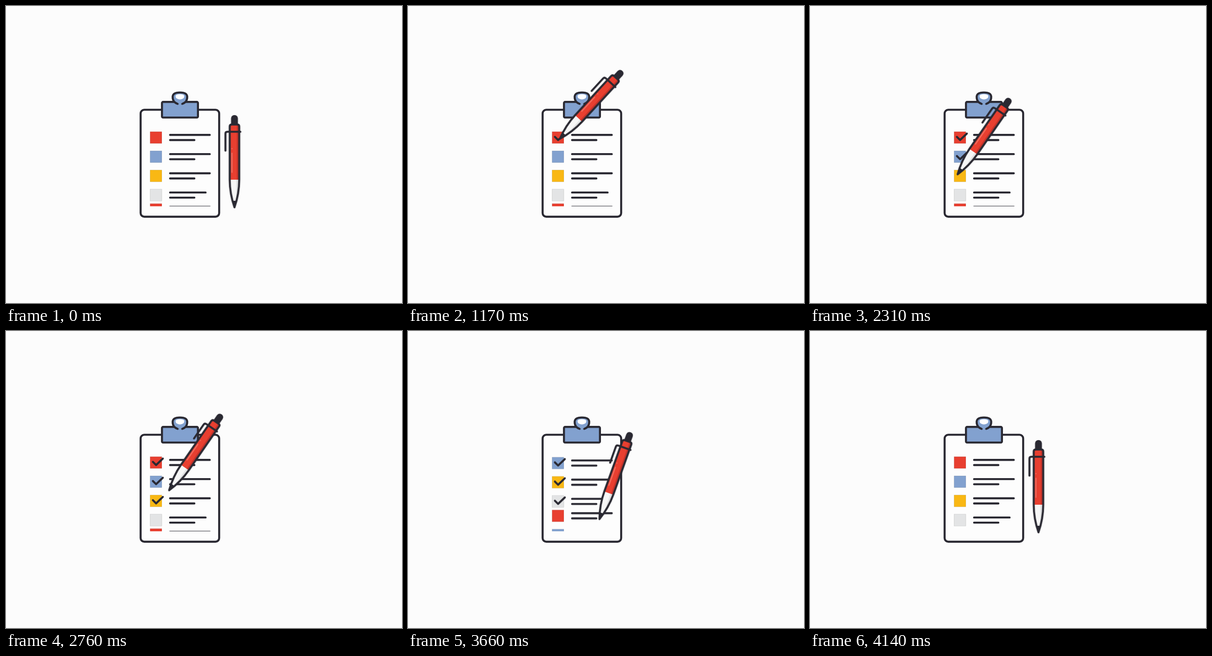
An HTML page without scripts for the animation above (4.5 s loop, 864x648 px).

```html
<!DOCTYPE html>
<html lang="en">
<head>
<meta charset="utf-8">
<title>Checklist</title>
<style>
  html, body { margin: 0; width: 100%; height: 100%; overflow: hidden; background: #fcfcfc; }
  svg { display: block; width: 864px; height: 648px; }
  :root { --ink: #2a2932; --blue: #82a1cf; --red: #e83f30; --gold: #f9b814; --grey: #e3e4e5; }

  .ink { stroke: var(--ink); stroke-width: 4.4; stroke-linecap: round; stroke-linejoin: round; }
  .open { fill: none; }
  .box { stroke: #0003; stroke-width: .6; }
  .tick { stroke-dasharray: 100 300; }

  .pen, .list, .tick { animation: 4.5s linear infinite; }
  .pen { animation-name: write; }
  .list { animation-name: scroll; }
  .t1 { animation-name: tick1; }
  .t2 { animation-name: tick2; }
  .t3 { animation-name: tick3; }
  .t4 { animation-name: tick4; }

  /* Pen tip position and tilt: start, corner, end and lift of each tick */
  @keyframes write {
    0% { transform: translate(498.5px, 442px) rotate(0deg); animation-timing-function: ease-in-out; }
    17.33%, 21.78% { transform: translate(320px, 286.5px) rotate(44deg); }
    25.56% { transform: translate(327px, 294px) rotate(43.5deg); }
    28.44% { transform: translate(343px, 279.5px) rotate(38deg); animation-timing-function: ease-out; }
    31.56% { transform: translate(351px, 270px) rotate(35deg); animation-timing-function: ease-in-out; }
    35.56%, 37.33% { transform: translate(320px, 328.5px) rotate(36deg); }
    40.89% { transform: translate(327px, 335.8px) rotate(36deg); }
    43.67% { transform: translate(343px, 321.3px) rotate(35deg); animation-timing-function: ease-out; }
    46.78% { transform: translate(349px, 311px) rotate(34.7deg); animation-timing-function: ease-in-out; }
    50.73%, 52.44% { transform: translate(320.5px, 369.5px) rotate(34.7deg); }
    56.04% { transform: translate(327px, 377.6px) rotate(34.7deg); }
    58.89% { transform: translate(343px, 363px) rotate(34.7deg); animation-timing-function: ease-out; }
    61.89% { transform: translate(355px, 349px) rotate(34.7deg); animation-timing-function: ease-in-out; }
    65.89%, 67.67% { transform: translate(320.5px, 412px) rotate(34.7deg); }
    71.33% { transform: translate(326.5px, 419.7px) rotate(34.7deg); }
    74.11% { transform: translate(343px, 405px) rotate(34.7deg); animation-timing-function: ease-out; }
    77.11%, 77.78% { transform: translate(355px, 391px) rotate(34.7deg); animation-timing-function: ease-in-out; }
    85.56%, 100% { transform: translate(498.5px, 442px) rotate(0deg); }
  }
  @keyframes scroll {
    0%, 75.56% { transform: translateY(0); animation-timing-function: ease-in-out; }
    92%, 100% { transform: translateY(-157px); }
  }
  @keyframes tick1 { 0%, 21.78% { stroke-dashoffset: 110; } 25.56% { stroke-dashoffset: 68; } 28.44%, 100% { stroke-dashoffset: 0; } }
  @keyframes tick2 { 0%, 37.33% { stroke-dashoffset: 110; } 40.89% { stroke-dashoffset: 68; } 43.67%, 100% { stroke-dashoffset: 0; } }
  @keyframes tick3 { 0%, 52.44% { stroke-dashoffset: 110; } 56.04% { stroke-dashoffset: 68; } 58.89%, 100% { stroke-dashoffset: 0; } }
  @keyframes tick4 { 0%, 67.67% { stroke-dashoffset: 110; } 71.33% { stroke-dashoffset: 68; } 74.11%, 100% { stroke-dashoffset: 0; } }
</style>
</head>
<body>
<svg viewBox="0 0 864 648" xmlns="http://www.w3.org/2000/svg">
  <defs>
    <clipPath id="window"><rect x="300" y="270" width="160" height="167"/></clipPath>
    <path id="barrel" d="M-10.4 -63V-179q0 -4.5 4.5 -4.5H5.9q4.5 0 4.5 4.5V-63C10.4 -38 6 -20 0 -2.8C-6 -20 -10.4 -38 -10.4 -63Z"/>
    <clipPath id="inside"><use href="#barrel"/></clipPath>

    <rect id="box" class="box" x="314.4" y="274.2" width="25.6" height="25.6"/>
    <g id="row">
      <use href="#box"/>
      <path class="ink open" d="M358 281.3H444.6M358 292.5H411"/>
    </g>
    <g id="rows">
      <use href="#row" fill="var(--red)"/>
      <use href="#row" y="41.85" fill="var(--blue)"/>
      <use href="#row" y="83.7" fill="var(--gold)"/>
      <use href="#box" y="125.55" fill="var(--grey)"/>
      <path class="ink open" d="M358 406.9H435.5M358 418.1H411"/>
    </g>
  </defs>

  <rect width="864" height="648" fill="#fcfcfc"/>

  <!-- Clipboard -->
  <rect class="ink" x="293.7" y="226.4" width="171.4" height="233.3" rx="8" fill="#fdfdfd"/>
  <rect class="ink" x="340.3" y="209.2" width="78.5" height="34.2" rx="2.5" fill="var(--blue)"/>
  <path class="ink" fill="var(--blue)" d="M374.5 213.5C367 211 363.6 205 363.6 198.5C363.6 191.5 370 188.6 379.5 188.6S395.4 191.5 395.4 198.5C395.4 205 392 211 384.5 213.5"/>
  <path fill="#fff" d="M370 197C370 193.500 374 192.400 379.500 192.400S389 193.500 389 197C389 201.500 384 203.800 379.500 203.800S370 201.500 370 197Z"/>

  <g clip-path="url(#window)">
    <g class="list">
      <use href="#rows"/>
      <use href="#rows" y="157"/>
      <g class="ink open">
        <path class="tick t1" pathLength="100" d="M320.5 285.500l7 6.900L342.200 278.300"/>
        <path class="tick t2" pathLength="100" d="M320.5 327.350l7 6.900L342.200 320.150"/>
        <path class="tick t3" pathLength="100" d="M320.5 369.200l7 6.900L342.200 362"/>
        <path class="tick t4" pathLength="100" d="M320.5 411.050l7 6.900L342.200 403.850"/>
      </g>
    </g>
  </g>

  <!-- Pen, tip at the local origin -->
  <g class="pen">
    <rect x="-7.5" y="-204" width="15" height="26" rx="7.2" fill="var(--ink)"/>
    <g clip-path="url(#inside)">
      <rect x="-12" y="-186" width="24" height="123" fill="var(--red)"/>
      <rect x="5" y="-186" width="7" height="123" fill="#c5332a"/>
      <rect x="-12" y="-63" width="24" height="50" fill="#f6f6f6"/>
      <rect x="4" y="-63" width="8" height="50" fill="#e2e3e4"/>
      <rect x="-12" y="-17" width="24" height="17" fill="var(--ink)"/>
    </g>
    <path d="M-5.500 -121V-79M-5.500 -131v.5" fill="none" stroke="#f07a6c" stroke-width="2" stroke-linecap="round"/>
    <use href="#barrel" class="ink open"/>
    <path class="ink open" stroke-width="4" d="M12.800 -167.600H-15.500q-4.200 0 -4.200 4.200V-126.500"/>
  </g>
</svg>
</body>
</html>
```
